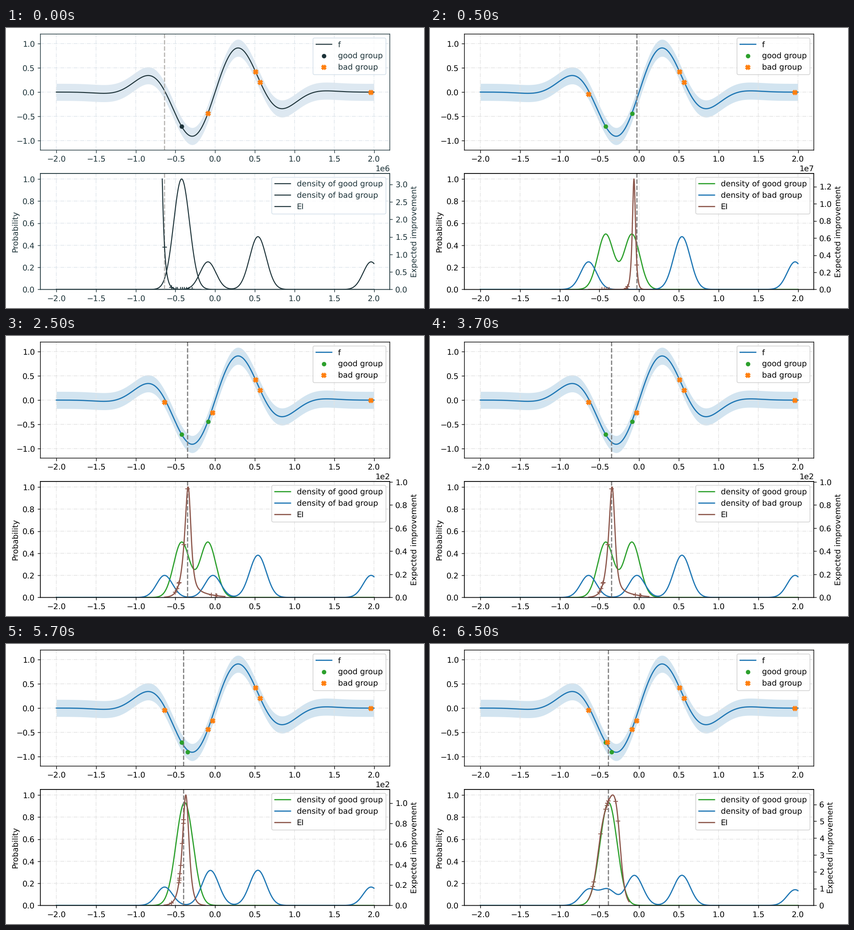
A matplotlib script that plays this animation: 914 px wide and 612 px high, repeating every 8 s.

```python
import numpy as np
import matplotlib.pyplot as plt
from matplotlib.animation import FuncAnimation

W, H, DPI = 914, 612, 123
SIGMA = 0.1
BAND = 0.176
START = 5            # trials known before the first step
GOOD_SHARE = 0.2     # best part of the trials that forms the good group
MIN_DENSITY = 0.05   # improvement is shown where good density exceeds this

# Trials in order; the last one is only proposed
TRIAL_X = np.array([0.509, 0.569, 1.964, -0.422, -0.0906,
                    -0.637, -0.028, -0.347, -0.397, -0.387])
TRIAL_Y = np.array([0.415, 0.195, -0.005, -0.710, -0.440,
                    -0.050, -0.264, -0.900, -0.705])

FULL = dict(ink="black", f="#1f77b4", good="#2ca02c", bad="#1f77b4",
            ei="#8c564b", band="#d2e4f0", next="#7f7f7f", grid="#e2e2e2",
            frame="#cccccc", lw=1.5)
MUTED = {**FULL, **dict.fromkeys(("ink", "f", "good", "bad", "ei"), "#1c3238"),
         "band": "#dde8f1", "next": "#b9b7b4", "grid": "#dee5eb",
         "frame": "#cfdde8", "lw": 1.25}

# Smooth subpixel edges and glyphs
plt.rcParams.update({"path.snap": False, "text.hinting": "none"})
fig = plt.figure(figsize=((W + 1e-6) / DPI, (H + 1e-6) / DPI), dpi=DPI,
                 facecolor="white")
xs = np.linspace(-2, 2, 4001)


def objective(x):
    return np.sin(5 * x) * (1 - np.tanh(x ** 2))


def density(x, centers):
    return np.mean([np.exp(-(x - c) ** 2 / (2 * SIGMA ** 2))
                    for c in centers], axis=0)


def split_trials(count):
    order = np.argsort(TRIAL_Y[:count])
    good_count = int(np.ceil(GOOD_SHARE * count))
    return order[:good_count], order[good_count:]


def draw_candidates(good_x, x_next, ex, ei, seed):
    """Sample the good density; the proposed x is the best candidate."""
    rng = np.random.default_rng(seed)
    cand = rng.choice(good_x, 10) + rng.normal(0, SIGMA, 10)
    cand = cand[(cand > ex[0]) & (cand < ex[-1])]
    cand = cand[np.interp(cand, ex, ei) < np.interp(x_next, ex, ei)]
    cand = np.append(cand, x_next)
    return cand, np.interp(cand, ex, ei)


def add_axes(top, height=253.6):
    ax = fig.add_axes([75.3 / W, 1 - (top + height) / H, 764 / W, height / H])
    ax.set_xlim(-2.2, 2.2)
    ax.grid(linestyle="-.")
    return ax


def draw_objective(good, bad, x_next, style):
    ax = add_axes(13.3)
    ax.set_ylim(-1.195, 1.195)
    ys = objective(xs)
    ax.fill_between(xs, ys - BAND, ys + BAND, color=style["band"], lw=0)
    ax.plot(xs, ys, color=style["f"], lw=style["lw"], label="f")
    ax.axvline(x_next, color=style["next"], ls="--")
    ax.plot(TRIAL_X[good], TRIAL_Y[good], "o", ms=4.7, color=style["good"],
            label="good group")
    ax.plot(TRIAL_X[bad], TRIAL_Y[bad], "X", ms=5.5, color="#ff7f0e",
            label="bad group")
    ax.legend(loc="upper right")


def draw_densities(good_x, bad_x, x_next, style, seed):
    ax = add_axes(317.9)
    ax.set_ylim(0, 1.05)
    ax.set_ylabel("Probability")
    good, bad = density(xs, good_x), density(xs, bad_x)
    handles = []
    for ys, key in ((good, "good"), (bad, "bad")):
        handles += ax.plot(xs, ys, color=style[key], lw=style["lw"],
                           label=f"density of {key} group")
    ax.axvline(x_next, color=style["next"], ls="--")

    twin = ax.twinx()
    shown = good >= MIN_DENSITY
    ex, ei = xs[shown], good[shown] / bad[shown]
    handles += twin.plot(ex, ei, color=style["ei"], lw=style["lw"], label="EI")
    twin.plot(*draw_candidates(good_x, x_next, ex, ei, seed), "+", ms=6,
              color=style["ei"])
    twin.set_ylim(0, 1.05 * ei.max())
    twin.set_ylabel("Expected improvement")
    twin.ticklabel_format(axis="y", style="sci", scilimits=(0, 0))
    twin.legend(handles=handles, loc="upper right")


def update(i):
    step = (i + 3) // 4
    style = FULL if step else MUTED
    # Ticks made while drawing also read these, so they stay set
    plt.rcParams.update({"grid.color": style["grid"],
                         "legend.edgecolor": style["frame"]})
    for key in ("text.color", "axes.edgecolor", "axes.labelcolor",
                "xtick.color", "ytick.color"):
        plt.rcParams[key] = style["ink"]
    fig.clear()
    count = START + step
    good, bad = split_trials(count)
    x_next = TRIAL_X[count]
    draw_objective(good, bad, x_next, style)
    draw_densities(TRIAL_X[good], TRIAL_X[bad], x_next, style, seed=step)
    return []


anim = FuncAnimation(fig, update, frames=16, interval=500, repeat=True,
                     repeat_delay=0, blit=False)
plt.show()
```
